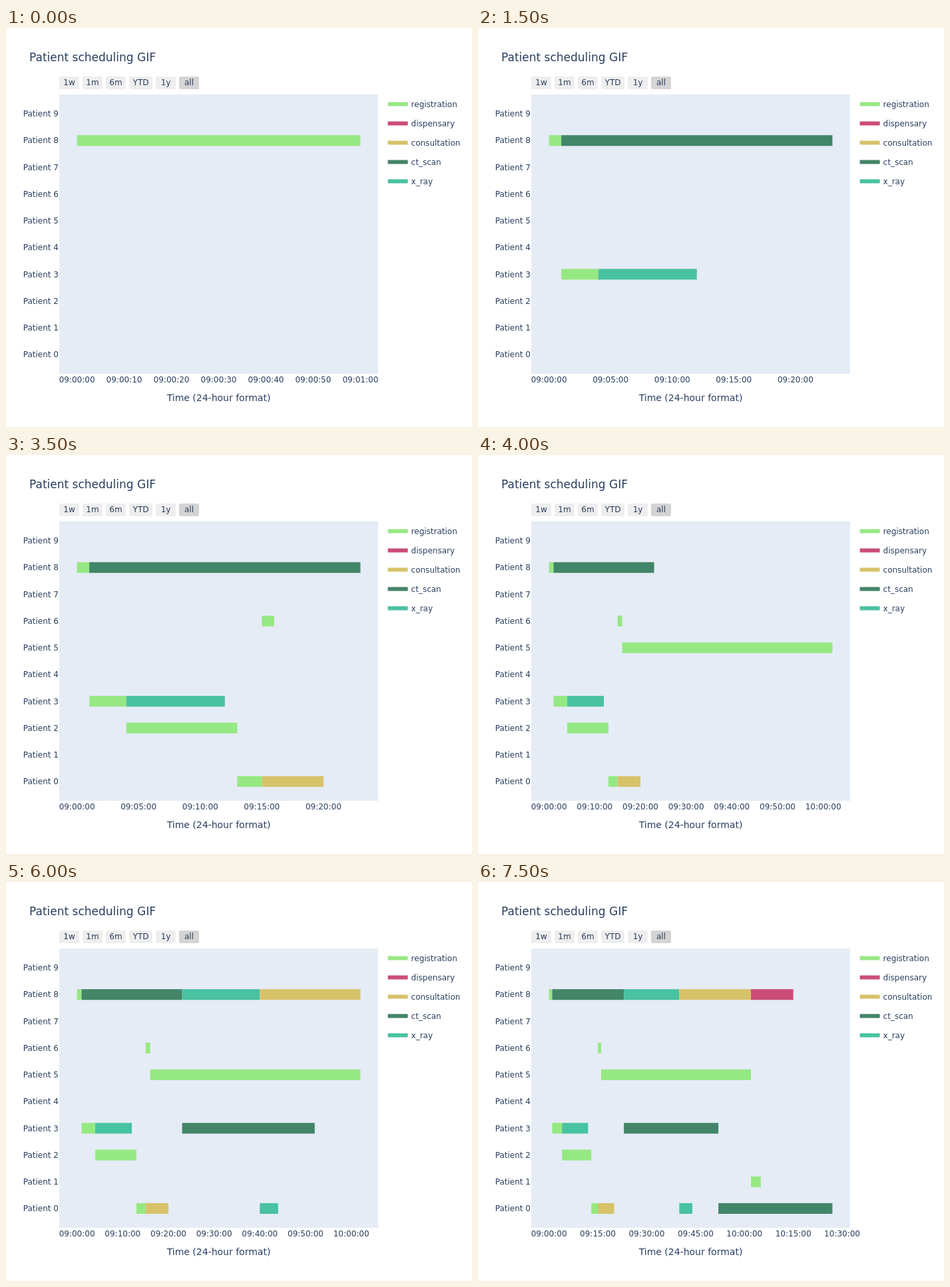
An HTML page that plays this animation: 700x600 px, repeating every 8 s.

```html
<!DOCTYPE html>
<html lang="en">
<head>
<meta charset="utf-8">
<title>Patient scheduling</title>
<style>
  html, body { margin: 0; width: 100%; height: 100%; overflow: hidden; background: #fff; }
  svg { display: block; }
  text { font: 12px "DejaVu Sans", sans-serif; fill: #2a3f5f; white-space: pre; }
  .mid { text-anchor: middle; }
  .end { text-anchor: end; }
  .title { font-size: 17px; }
  .axis { font-size: 14px; }
</style>
</head>
<body>
<svg id="stage" width="700" height="600" viewBox="0 0 700 600">
  <text class="title" x="35" y="50">Patient scheduling GIF</text>
  <rect x="80" y="100" width="479" height="420" fill="#e5ecf6"/>
  <text class="axis mid" x="319.5" y="561">Time (24-hour format)</text>
  <g id="fixed"></g>
  <g id="bars"></g>
  <g id="ticks"></g>
</svg>
<script>
const STEP = 500;
const COLORS = {
  registration: '#96e882',
  dispensary: '#cc4c78',
  consultation: '#d8c26a',
  ct_scan: '#428568',
  x_ray: '#48c2a0'
};

// patient, task, start and end in minutes after 09:00, in order of appearance
const TASKS = [
  [8, 'registration', 0, 1],
  [8, 'ct_scan', 1, 23],
  [3, 'registration', 1, 4],
  [3, 'x_ray', 4, 12],
  [2, 'registration', 4, 13],
  [0, 'registration', 13, 15],
  [0, 'consultation', 15, 20],
  [6, 'registration', 15, 16],
  [5, 'registration', 16, 62],
  [8, 'x_ray', 23, 40],
  [3, 'ct_scan', 23, 52],
  [0, 'x_ray', 40, 44],
  [8, 'consultation', 40, 62],
  [0, 'ct_scan', 52, 87],
  [8, 'dispensary', 62, 75],
  [1, 'registration', 62, 65]
];

const PAD = 479 / 18;
const LEFT = 80 + PAD;
const WIDTH = 479 - 2 * PAD;
const ROW = 40.22;
const BAR = ROW * 0.4;

const byId = id => document.getElementById(id);
const rowY = patient => 310 + (4.5 - patient) * ROW;
const rect = (x, y, w, h, fill, extra = '') =>
  `<rect x="${x}" y="${y}" width="${w}" height="${h}" fill="${fill}" ${extra}/>`;
const text = (x, y, label, cls = '') =>
  `<text x="${x}" y="${y}" class="${cls}">${label}</text>`;

function drawFixed() {
  let out = '', x = 80;
  for (const label of ['1w', '1m', '6m', 'YTD', '1y', 'all']) {
    const w = label === 'YTD' ? 35 : 30;
    out += rect(x, 73, w, 19, label === 'all' ? '#d4d4d4' : '#eee', 'rx="2"');
    out += text(x + w / 2, 86, label, 'mid');
    x += w + 5;
  }
  for (let p = 0; p < 10; p++) out += text(79, rowY(p) + 4.2, 'Patient ' + p, 'end');
  Object.entries(COLORS).forEach(([name, color], i) => {
    const y = 114.5 + 29 * i;
    out += rect(573.58, y - 3, 30, 6, color) + text(608.58, y + 4.2, name);
  });
  byId('fixed').innerHTML = out;
}

function clock(minutes) {
  const s = Math.round(minutes * 60) + 9 * 3600;
  return [s / 3600, s / 60 % 60, s % 60]
    .map(n => String(Math.floor(n)).padStart(2, '0')).join(':');
}

function tickGap(span) {
  return span <= 1 ? 1 / 6 : span <= 30 ? 5 : span <= 65 ? 10 : 15;
}

function drawChart(step) {
  const shown = TASKS.slice(0, step + 1);
  const span = Math.max(...shown.map(task => task[3]));
  const scale = WIDTH / span;
  const gap = tickGap(span);
  byId('bars').innerHTML = shown.map(([patient, task, from, to]) =>
    rect(LEFT + from * scale, rowY(patient) - BAR / 2, (to - from) * scale, BAR, COLORS[task])
  ).join('');
  let out = '';
  for (let i = 0; LEFT + i * gap * scale < 559; i++) {
    out += text(LEFT + i * gap * scale, 533, clock(i * gap), 'mid');
  }
  byId('ticks').innerHTML = out;
}

let last = -1;
function frame() {
  const step = Math.floor(performance.now() / STEP) % TASKS.length;
  if (step !== last) drawChart(last = step);
  requestAnimationFrame(frame);
}

drawFixed();
frame();
</script>
</body>
</html>
```
